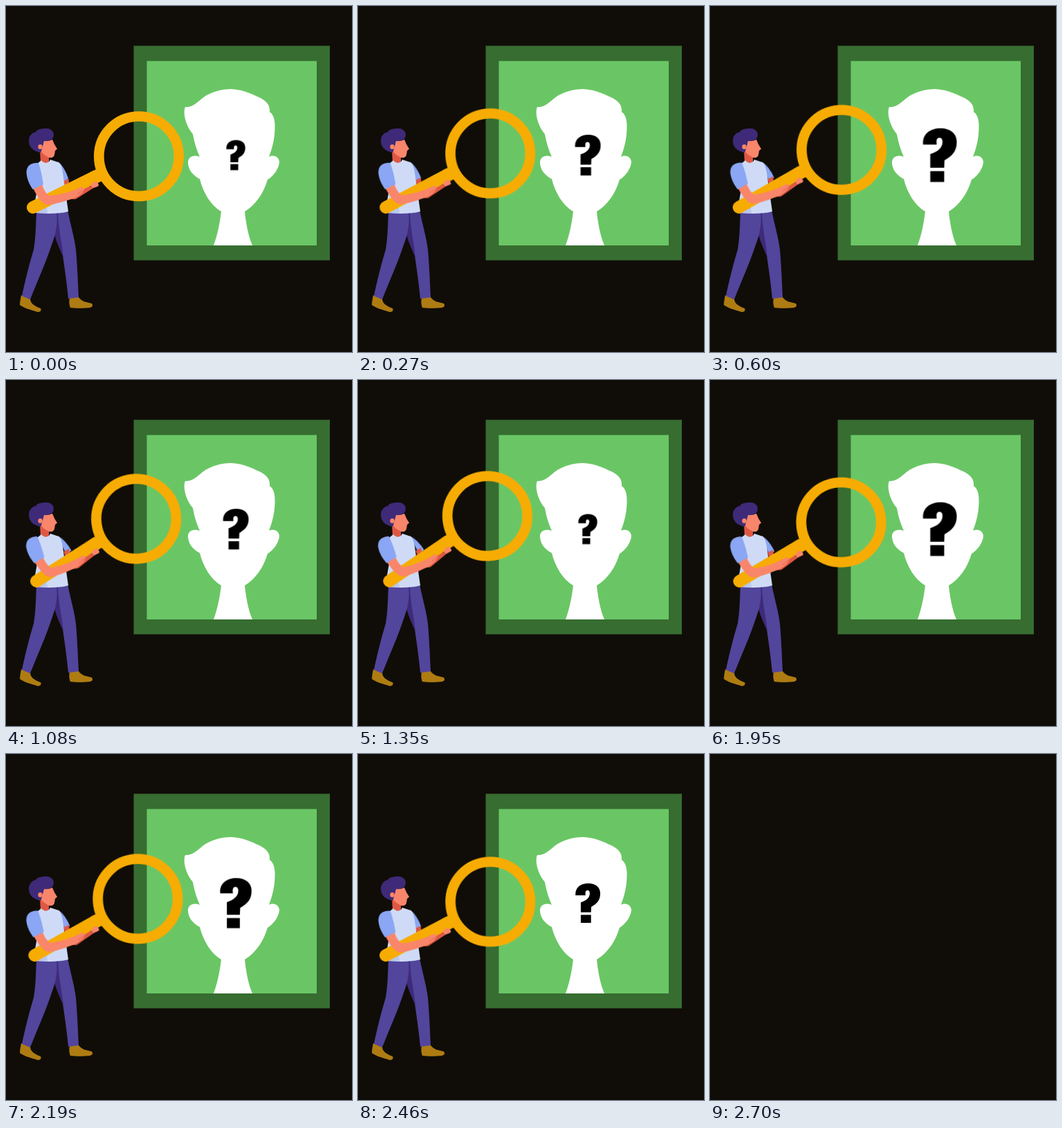
These frames come from a looping animation (500 px wide and 500 px high, 2730 ms). An HTML page:

```html
<!DOCTYPE html>
<html lang="en">
<head>
<meta charset="utf-8">
<title>Who is it?</title>
<style>
  html, body { margin: 0; width: 100%; height: 100%; overflow: hidden; background: #100d08; }
  svg { display: block; width: 100%; height: 100%; }
  .swing { transform-origin: 38px 244px; }
  #backSleeve { transform-origin: 77px 227px; }
  #mark { transform-origin: 332px 215.4px; }
  .skin { fill: #f9866a; }
  .shade { fill: #df5844; }
  .sleeve { fill: #8aa6f4; }
  .pants { fill: #52459c; }
  .dark { fill: #3e2a78; }
  .shoe { fill: #ae7c12; }
</style>
</head>
<body>
<svg viewBox="0 0 500 500">
  <g id="scene">
    <g id="portrait">
      <path fill="#376d30" d="M184.5 57.5H468V367.500H184.500Z"/>
      <path fill="#6ac665" d="M203.500 79.500H449V346H203.500Z"/>
      <path fill="#fff" d="M259 146C268 147 276 140 284 133C296 124 311 120 326 120C345 121 356 128 366 132C376 137 382 143 381 153C388 158 389 168 388.500 178C388 195 384 207 380 218C388 214 395 219 395 226C394 236 386 246 378 251C372 271 361 287 345 297C347 315 350 332 356 346H300C306 330 309 313 311 297C296 288 285 270 280 250C270 245 263 236 263 226C263 218 271 214 280 218C275 206 272 197 270 185C262 176 256 160 258 149Z"/>
      <g id="mark" role="img" aria-label="?">
        <path d="M307.500 200C306 185 317 176 333 176C348 176 357 184 357 196C357 211 349 217 339 223L338.500 234H318V214C330 210 336 204 336 196C336 191.500 334 190 331.500 190C328 190 326.500 193 327.500 200Z"/>
        <path d="M318 239H338.500V255H318Z"/>
      </g>
    </g>

    <g id="legs">
      <path class="shoe" d="M22 418L35 423C35 430 42 434 50 437C52 440 49 443 45 442C35 439 25 436 20 432C20 428 21 423 22 418Z"/>
      <path class="shoe" d="M92 421H105C110 428 118 428 124 430C126 433 125 435 121 436C112 437 100 437 93 436C91 432 91 427 92 421Z"/>
      <path class="pants" d="M70 297L89 295C93 315 99 335 101 352C103 375 104 400 105 421L90 423C88 400 84 375 82 360C77 345 70 330 68 322Z"/>
      <path class="dark" d="M73 298C72 308 70 315 68 322C71 337 77 350 82.500 362C82 345 76 328 75 298Z"/>
      <path class="pants" d="M44 297H73C75 315 72 330 66 345C58 370 45 398 35 424L23 419C27 400 33 375 40 352C43 335 43 318 44 297Z"/>
    </g>

    <path id="backSleeve" class="sleeve" d="M75 225C82 230 87 240 90 249.500L82 255Z"/>
    <g class="swing">
      <path class="shade" d="M82.500 253L90.500 249.500C91 256 92 262 94 268L120 260L128 262L101 279C95 280 91 278 88 274Z"/>
    </g>

    <g id="body">
      <path class="shade" d="M49 209L62 216L62 227L57 229L50 225Z"/>
      <path class="skin" d="M52 194C60 196 65 194 67 193L70 200L74 206.500L71 209L70 215C69 219 66 220 62 219C58 217 54 214 51 211Z"/>
      <path class="dark" d="M50 212C42 210 33 206 33 195C33 187 38 183 43 182C46 177 54 177 60 177C67 178 70 183 68.500 189C67 194 60 196 55 195L53 203Z"/>
      <ellipse class="skin" cx="49.500" cy="203.500" rx="3.200" ry="3.500"/>
      <path fill="#cfdbf6" d="M45 228L51 223C56 229 62 227 64 222L76 226C81 230 82 240 84 255L90 297C75 301 55 300 43 299L41 288L45 265Z"/>
      <path fill="#b9c7ef" d="M42 284L58 285L60 299.500L43 299Z"/>
    </g>

    <g class="swing">
      <g fill="none" stroke="#f6ac03">
        <path stroke-width="18" stroke-linecap="round" d="M39 291L130 246"/>
        <path stroke-width="19" d="M126 248.500L140 242"/>
        <circle cx="192" cy="217.200" r="57.700" stroke-width="14.700"/>
      </g>
      <path class="skin" d="M122 260C124 255 130 252 132 255C134 257 135 260 132 261L126 263Z"/>
      <path class="skin" d="M39 263L52 257C54 264 57 270 62 274C75 273 88 270 96 267L110 261.500L113 264C113 270 105 275 98 278C85 282 70 287 60 287.500C52 287 45 275 39 263Z"/>
      <path fill="none" stroke="#df5844" stroke-width=".8" d="M103 272L112 266"/>
      <path class="sleeve" d="M47 227C36 226 30 231 29.500 240C30 250 34 258 38.500 265L54 258C52 245 50 235 47 227Z"/>
    </g>
  </g>
</svg>
<script>
  const LOOP = 2730, END = 2700;

  // steps: [time in ms, value]; every change between steps is linear
  function loop(selector, prop, steps, format) {
    const frames = steps.map(([t, v]) => ({ offset: t / LOOP, [prop]: format(v) }));
    for (const el of document.querySelectorAll(selector)) {
      el.animate(frames, { duration: LOOP, iterations: Infinity }).startTime = start;
    }
  }

  const start = document.timeline.currentTime || 0;
  const rotate = v => `rotate(${v}deg)`;
  const upDown = peak => [[0, 0], [END / 2, peak], [END, 0], [LOOP, 0]];

  loop('.swing', 'transform', upDown(-7.8), rotate);
  loop('#backSleeve', 'transform', upDown(-15), rotate);
  loop('#mark', 'transform',
    [[0, .55], [675, 1.035], [1350, .55], [2025, 1.035], [END, .55], [LOOP, .55]],
    v => `scale(${v})`);
  loop('#scene', 'opacity', [[0, 1], [END - 1, 1], [END - 1, 0], [LOOP, 0]], String);
</script>
</body>
</html>
```
